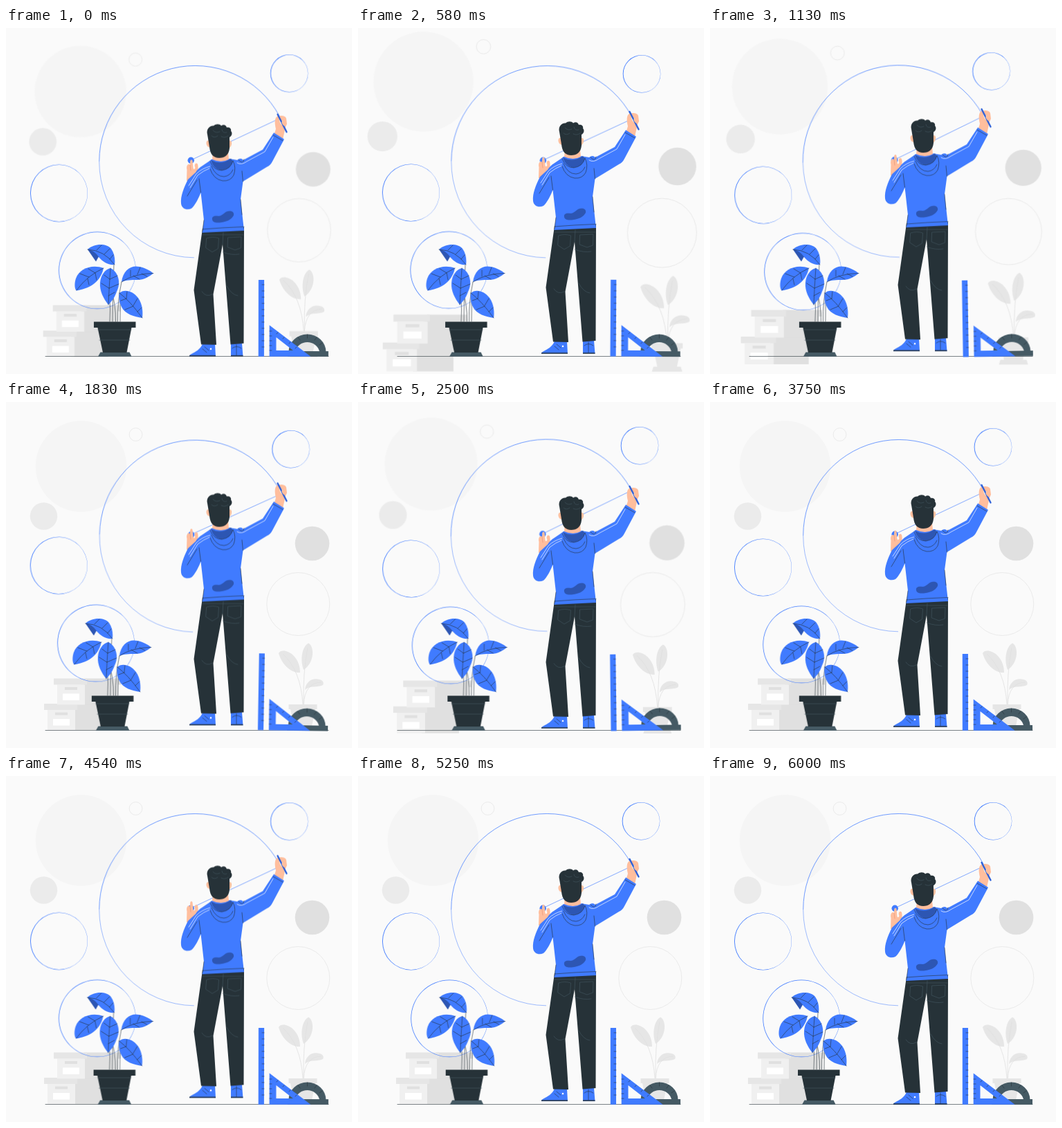
An HTML page without scripts that plays this animation: 500x500 px, repeating every 6040 ms.

```html
<!DOCTYPE html>
<html lang="en">
<head>
<meta charset="utf-8">
<title>Drawing circles</title>
<style>
  html, body { margin: 0; width: 100%; height: 100%; overflow: hidden; background: #fafafa; }
  svg { display: block; width: 100vw; height: 100vh; }
  .beat, .float, .shake, .wind {
    transform-box: view-box;
    animation: 6.04s linear -40ms infinite;
  }
  .beat { animation-name: beat; transform-origin: 250px 250px; }
  .shake { animation-name: shake; }
  .float { animation-name: float; animation-duration: 3.02s; }
  .wind { animation-name: wind; animation-duration: 1.51s; }
  .rings { transform-origin: 236px 222px; }
  .tools { transform-origin: 415px 420px; }

  @keyframes beat {
    0%, 30%, 40%, 60%, 100% { transform: scale(1); }
    10%, 50% { transform: scale(1.1); }
  }
  @keyframes shake {
    0%, 100% { transform: translateX(0); }
    10%, 90% { transform: translateX(-1px); }
    20%, 80% { transform: translateX(2px); }
    30%, 50%, 70% { transform: translateX(-4px); }
    40%, 60% { transform: translateX(4px); }
  }
  @keyframes float {
    0%, 100% { transform: translateY(0); }
    50% { transform: translateY(-10px); }
  }
  @keyframes wind {
    0%, 100% { transform: rotate(0deg); }
    25% { transform: rotate(1deg); }
    75% { transform: rotate(-1deg); }
  }

  .blue { fill: #407bff; }
  .navy { fill: #2d56b3; }
  .dark { fill: #263238; }
  .slate { fill: #455a64; }
  .skin { fill: #ffbe9d; }
  .pale { fill: #ebebeb; }
  .grey { fill: #e0e0e0; }
  .line { fill: none; stroke: #263238; stroke-width: .6; stroke-linecap: round; stroke-linejoin: round; }
  .soft { stroke: #455a64; }
  .white { stroke: #fff; stroke-width: .7; }
</style>
</head>
<body>
<svg viewBox="0 0 500 500">
  <defs>
    <g id="box">
      <path class="grey" d="M40 9H93V38H40ZM44 0H97V9H44Z"/>
      <path fill="#f0f0f0" d="M5 9H45V38H5Z"/>
      <path fill="#e6e6e6" d="M0 0H48V9H0Z"/>
      <path class="grey" d="M16 12.5H34V16.500H16Z"/>
      <path fill="#fff" d="M13 22H37V31.500H13Z"/>
    </g>
  </defs>

  <g class="beat">
    <circle cx="108.500" cy="93" r="65.700" fill="#f5f5f5"/>
    <circle class="pale" cx="54.500" cy="165" r="19.700"/>
    <circle class="grey" cx="442.500" cy="204.500" r="24.800"/>
    <g fill="none" stroke="#e6e6e6" stroke-width=".8">
      <circle cx="187.500" cy="47" r="9.400"/>
      <circle cx="422.300" cy="292" r="45.500"/>
    </g>
    <use href="#box" x="55" y="436"/>
    <use href="#box" x="69" y="399.500"/>
    <g fill="#e6e6e6">
      <path d="M425 391C411 392 398 378 394 363C397 357 408 359 415 366C422 373 425 382 425 391Z"/>
      <path d="M430 387C425 374 427 354 437 348.500C446 353 446 377 430 387Z"/>
      <path d="M432 416C433 404 443 398 453 401C458 402 460 406 458 409C450 413 440 409 432 416Z"/>
      <path d="M408.500 437H449.500V444H408.500ZM411 444H447L442 468H416ZM411 468H447L449 474.500H409Z"/>
    </g>
    <path d="M400 364Q426 388 429 437M436 355Q429 390 430 437M455 405Q432 406 430 437" fill="none" stroke="#e0e0e0" stroke-width=".8"/>
  </g>

  <path class="line" d="M57 474.500H466"/>

  <g class="wind rings">
    <!-- thin crescents: an outer circle minus a slightly shifted inner one -->
    <g class="blue" fill-rule="evenodd">
      <path d="M35 239a41.500 41.500 0 1 1 83 0a41.500 41.500 0 1 1-83 0ZM35.900 239a40.900 40.900 0 1 1 81.800 0a40.900 40.900 0 1 1-81.800 0Z"/>
      <path d="M76.300 350.400a55.800 55.800 0 1 1 111.600 0a55.800 55.800 0 1 1-111.600 0ZM77.100 350.400a55.200 55.200 0 1 1 110.400 0a55.200 55.200 0 1 1-110.400 0Z"/>
      <path d="M381.700 65.300a27.300 27.300 0 1 1 54.600 0a27.300 27.300 0 1 1-54.600 0ZM382.600 65.300a26.700 26.700 0 1 1 53.400 0a26.700 26.700 0 1 1-53.400 0Z"/>
    </g>
    <g fill="none" stroke="#407bff">
      <path stroke-width=".75" d="M395 127A138.500 138.500 0 0 0 134.700 193"/>
      <path stroke-width=".5" d="M134.700 193A138.500 138.500 0 0 0 272 331.800"/>
      <path stroke-width=".65" d="M267 191L392 132"/>
    </g>
    <circle class="blue" cx="267.200" cy="191.200" r="4.700"/>
  </g>

  <g class="shake">
    <path class="line" d="M150 424Q151 407 150 390M154 424Q154 395 156 341M158.500 424Q159 400 151 372M161.500 424Q161 395 167 367M165 424Q166 402 164 383"/>
    <g class="blue">
      <path d="M118 320C128 311 145 311 152 319C157 326 158 335 157 342C148 343 140 338 134 331Z"/>
      <path d="M141 347C125 341 106 347 101 362C98 371 100 379 102 379.500C117 377 136 370 141 347Z"/>
      <path d="M151 347C162 352 167 368 160 381C157 390 152 396 148 400C141 391 135 380 136 368C137 357 143 349 151 347Z"/>
      <path d="M167 367C169 350 181 342 193 345C202 347 209 351 213 354.500C207 359 200 364 190 364C181 364 174 364 167 367Z"/>
      <path d="M164 383C170 377 183 379 191 390C198 400 198 412 197 419C186 417 172 414 167 403C163 395 163 388 164 383Z"/>
    </g>
    <path class="navy" d="M118 320L130 337.500L134 330.500Q127 321 118 320Z"/>
    <path class="line" d="M118 320Q142 321 157 342M131 321L138 314M142 327L150 319M150 334L155 328
      M141 347Q117 358 102 379M129 354L119 348M120 360L107 355M129 354L131 364M118 362L120 371
      M151 347Q149 375 148 400M150 363L142 357M149 376L138 369M150 363L161 358M149 376L163 370M148 387L157 382
      M167 367Q184 355 213 354.500M180 359L180 350M190 356L194 346M184 358L193 363M196 355L204 359
      M164 383Q179 394 197 419M174 391L175 381M184 401L190 391M174 391L166 394M184 402L172 407M190 410L196 404"/>
    <path class="slate" d="M136.500 468.500H178.500L181.500 474.800H133Z"/>
    <path class="dark" d="M127 424.500H187.500V433H127ZM132.500 433H181.500L174.500 469H140Z"/>
    <path class="line soft" d="M133 436H181M135 451H179"/>
  </g>

  <g class="float">
    <!-- shoes -->
    <path class="blue" d="M284 457H302L303 474.700H265C265 470 278 470 284 457ZM325 456H341L342.500 474.700H325Z"/>
    <path class="dark" d="M265 473.200H303V474.800H265ZM325 473.200H342.500V474.800H325Z"/>
    <path class="line" d="M287 461L293 466M284 464L290 469M333 458V473M327 463Q333 458 340 463"/>
    <circle cx="296" cy="464" r="1.300" fill="#fff"/>

    <!-- trousers -->
    <path class="dark" d="M284 290L344 288L343.500 456L324.500 457.500L319 388L313 313L299.500 385L304 458L282 457.500L271.500 379Z"/>
    <path class="line soft" d="M290 304Q299 301 307.500 304L306.500 319L298 324L289 318ZM321 303L340 302L339.500 318L331 321L320.500 317ZM284 299H343M314 296L313 313M283 381Q289 390 298 385M319 373Q326 386 335 387M313 324Q326 329 337 327"/>

    <!-- hands -->
    <path class="skin" d="M261 221L261.500 205C260 200 263 195 266 198L266.300 192Q268 189.500 269.500 192L270.500 203Q272 206 273.500 202C271 197 275 194 277 197C279 204 276 211 271 222Z"/>
    <path class="line" d="M266 198L267 206" style="stroke:#e58f70"/>
    <path class="skin" d="M387 156L390 146C388 138 388 130 392 128C397 126 404 127 405 131L406 139L403 145C403 150 401 155 400 162Z"/>
    <path d="M395 133Q400 133 402 139Q399 143 396 137Z" fill="#fafafa"/>
    <path d="M392.500 125L405.500 150.500" stroke="#2f62d9" stroke-width="2.400" stroke-linecap="round"/>
    <path class="skin" d="M398 136Q404 133 405 138L404 142Q400 142 398 136Z"/>

    <!-- hoodie -->
    <path class="blue" d="M297 190C289 197 278 201 274 209L263 219C257 231 252 243 253 254C254 262 262 264 268 261C273 257 279 245 281.500 238L286 278L283.500 296L344 293L339 248L342.500 222L377 201Q382 199 385 193L402 161L387 151.500L371 176L343 191Q339 187 334 191L322 189Z"/>
    <path class="line" d="M276 220L262 243M281.500 238L279 218M342.500 222L341 207M284 291Q314 288.500 344 287.500M286 278L284 294M339 248L341 270M386 155L400 163M336 191Q343 198 344 190"/>
    <path class="line white" d="M264 228L275 211Q283 203 295 200M266 231L277 213Q286 206 294 203M334 195Q340 199 348 193L374 179L386 158"/>
    <path class="navy" d="M298 277C297 272 302 271 307 272C313 272 315 266 321 265C327 264 330 267 329 271C326 277 319 280 312 281C305 282 299 282 298 277Z"/>

    <!-- hood, neck and head -->
    <path class="navy" d="M296 191Q310 199 325 189L329 195Q322 206 311 206Q300 204 296 191Z"/>
    <path class="skin" d="M299 180H321L322 190Q311 196 298 190Z"/>
    <path class="blue" d="M295 193Q300 206 312 206Q325 204 328 192Q333 202 329 213Q324 222 313 221Q300 219 295 204Z"/>
    <path class="line" d="M295 193Q300 206 312 206Q325 204 328 192Q333 202 329 213Q324 222 313 221Q300 219 295 204M297 200Q303 215 315 215Q324 214 328 205"/>
    <path class="skin" d="M294 163C288 161 288 171 294 173ZM322 163C328 161 327 172 322 174Z"/>
    <path class="dark" d="M294 172L291 154C289 147 294 141 300 141.500C304 138 309 139 311 141.500C315 139 318 141 319 144C324 143 326 147 325 149C328 152 326 157 323 158L323 174C322 184 316 188 308 188C300 188 295 183 294 172Z"/>
    <path class="line soft" d="M299 148Q303 153 309 150M312 147Q313 153 319 151M297 156Q301 160 306 156M311 157Q316 160 321 156"/>
  </g>

  <g class="wind tools">
    <path class="slate" fill-rule="evenodd" d="M408.500 468A27 25.500 0 0 1 462.500 468ZM418 467A18 17 0 0 1 453 467Z"/>
    <path class="slate" d="M407 467H466V474.700H407Z"/>
    <path class="line" d="M414 455L418 458M422 447L425 451M435.500 443V448M449 447L446 451M457 455L453 458"/>
    <path class="blue" d="M364.800 364H373V474.800H364.800Z"/>
    <path class="line" d="M370 371h3m-3 9h3m-3 9h3m-3 9h3m-3 9h3m-3 9h3m-3 9h3m-3 9h3m-3 9h3m-3 9h3m-3 9h3"/>
    <path class="blue" fill-rule="evenodd" d="M380.700 429.500L440.500 474.700H380.700ZM390.500 447V466H415Z"/>
    <path class="line" d="M381 438h3m-3 7h3m-3 7h3m-3 7h3m-3 7h3M393 440l-2 2M402 447l-2 2M411 454l-2 2M420 461l-2 2"/>
  </g>
</svg>
</body>
</html>
```
